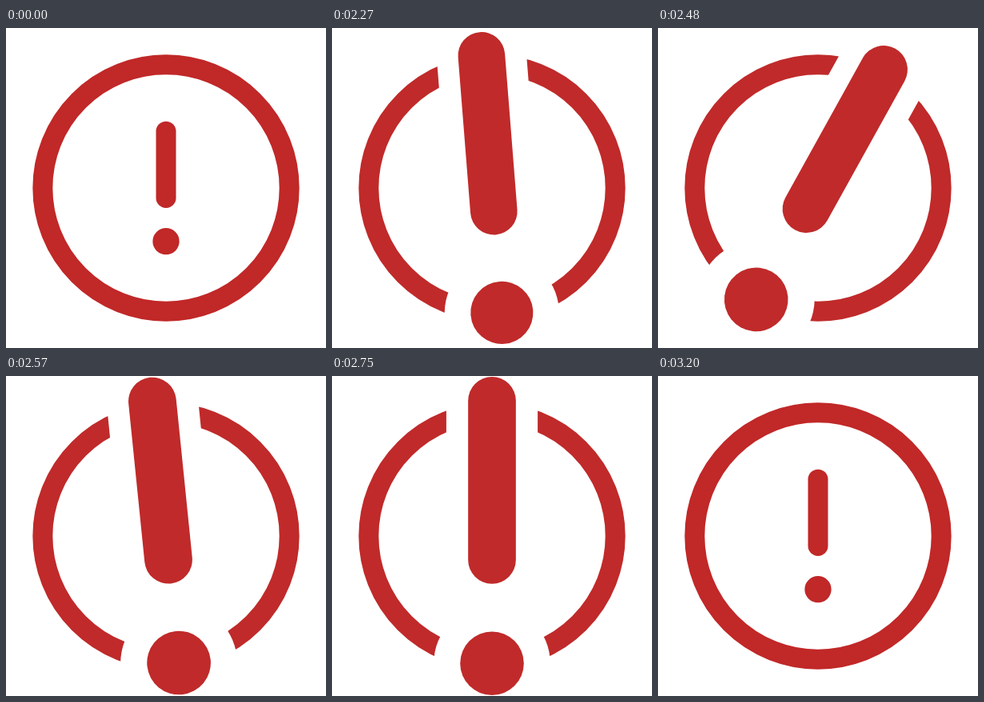
These frames come from a looping animation (400x400 px, 3230 ms). An HTML page:

```html
<!DOCTYPE html>
<html lang="en">
<head>
<meta charset="utf-8">
<title>Alert</title>
<style>
  html, body { margin: 0; width: 100%; height: 100%; overflow: hidden; background: #fff; }
  svg { display: block; width: 100vw; height: 100vh; }
</style>
</head>
<body>
<svg viewBox="-12 -12 24 24">
  <g id="icon" color="#c12828" fill="none" stroke-linecap="round">
    <circle r="9.25" stroke="currentColor" stroke-width="1.5"/>
    <g id="mark">
      <!-- white halo that cuts the ring -->
      <path d="M0-4.25V.75" stroke="#fff" stroke-width="2.87"/>
      <circle cy="4" r="1.83" fill="#fff"/>
      <path d="M0-4.25V.75" stroke="currentColor" stroke-width="1.5"/>
      <circle cy="4" r="1" fill="currentColor"/>
    </g>
  </g>
</svg>
<script>
  const LOOP = 3230, HOLD = 2000, STEP = 30, LAST = 40;
  const PEAK = 2.39, TILT = 29;
  const icon = document.getElementById('icon');
  const mark = document.getElementById('mark');

  const clamp = p => Math.min(1, Math.max(0, p));
  const ease = p => (1 - Math.cos(Math.PI * clamp(p))) / 2;
  const ramp = (k, from, to) => ease((k - from) / (to - from));

  // [step, degrees], straight lines between
  const swing = [[8.63, 0], [11, -TILT], [16, TILT], [21, -TILT], [23.4, 0]];

  function angle(k) {
    for (let i = 1; i < swing.length; i++) {
      const [a, u] = swing[i - 1], [b, v] = swing[i];
      if (k >= a && k <= b) return u + (v - u) * (k - a) / (b - a);
    }
    return 0;
  }

  function draw(ms) {
    const k = Math.max(0, Math.floor((ms % LOOP - HOLD) / STEP));
    const scale = 1 + (PEAK - 1) * (ramp(k, 0.5, 10.1) - ramp(k, 24.6, LAST));
    mark.setAttribute('transform', `rotate(${angle(k)}) scale(${scale})`);
    icon.setAttribute('color', k > 0 && k < LAST ? '#c02a2a' : '#c12828');
  }

  const start = performance.now();
  function tick() {
    draw(performance.now() - start);
    requestAnimationFrame(tick);
  }
  tick();
</script>
</body>
</html>
```
